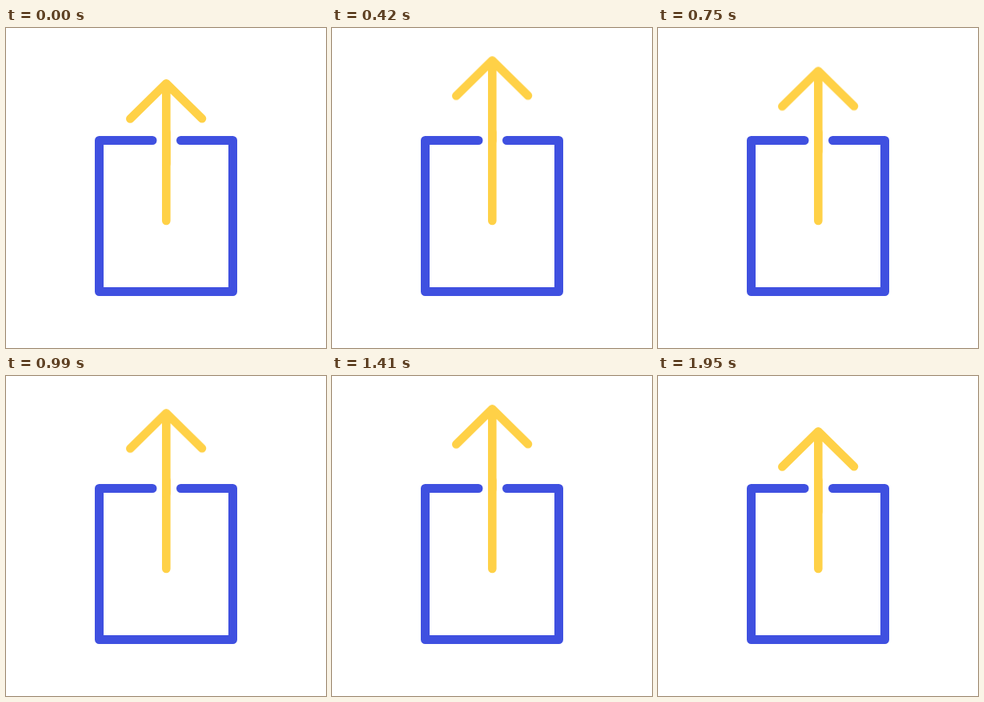
An HTML page without scripts that plays this animation: 400x400 px, repeating every 5.66 s.

```html
<!DOCTYPE html>
<html lang="en">
<head>
<meta charset="utf-8">
<title>Share arrow</title>
<style>
  html, body {
    margin: 0;
    width: 100%;
    height: 100%;
    overflow: hidden;
    background: #fff;
  }
  svg {
    display: block;
    width: 100%;
    height: 100%;
    fill: none;
    stroke-width: 11;
    stroke-linecap: round;
    stroke-linejoin: round;
  }
  .box { stroke: #3f50e0; }
  .arrow { stroke: #ffd147; stroke-width: 10.6; }

  /* Rise, bob twice, then dip below rest and settle; idle for the remainder. */
  .head { animation: bob 5660ms cubic-bezier(.37, 0, .63, 1) infinite; }
  @keyframes bob {
    0%      { transform: translateY(0); }
    7.42%   { transform: translateY(-28.7px); }
    11.66%  { transform: translateY(-9.5px); }
    15.9%   { transform: translateY(-28.7px); }
    20.27%  { transform: translateY(-9px); }
    24.38%  { transform: translateY(-28.7px); }
    31.27%  { transform: translateY(8px); }
    34.45%, 100% { transform: translateY(0); }
  }
</style>
</head>
<body>
<svg viewBox="0 0 400 400">
  <path class="box" d="M183 140.5H116.5V329.5H283.5V140.5H218.5"/>
  <g class="arrow">
    <path d="M200.3 130V241"/>
    <path class="head" d="M155.3 113.5L200.3 69.3L245 113.3M200.3 69.3V170"/>
  </g>
</svg>
</body>
</html>
```
